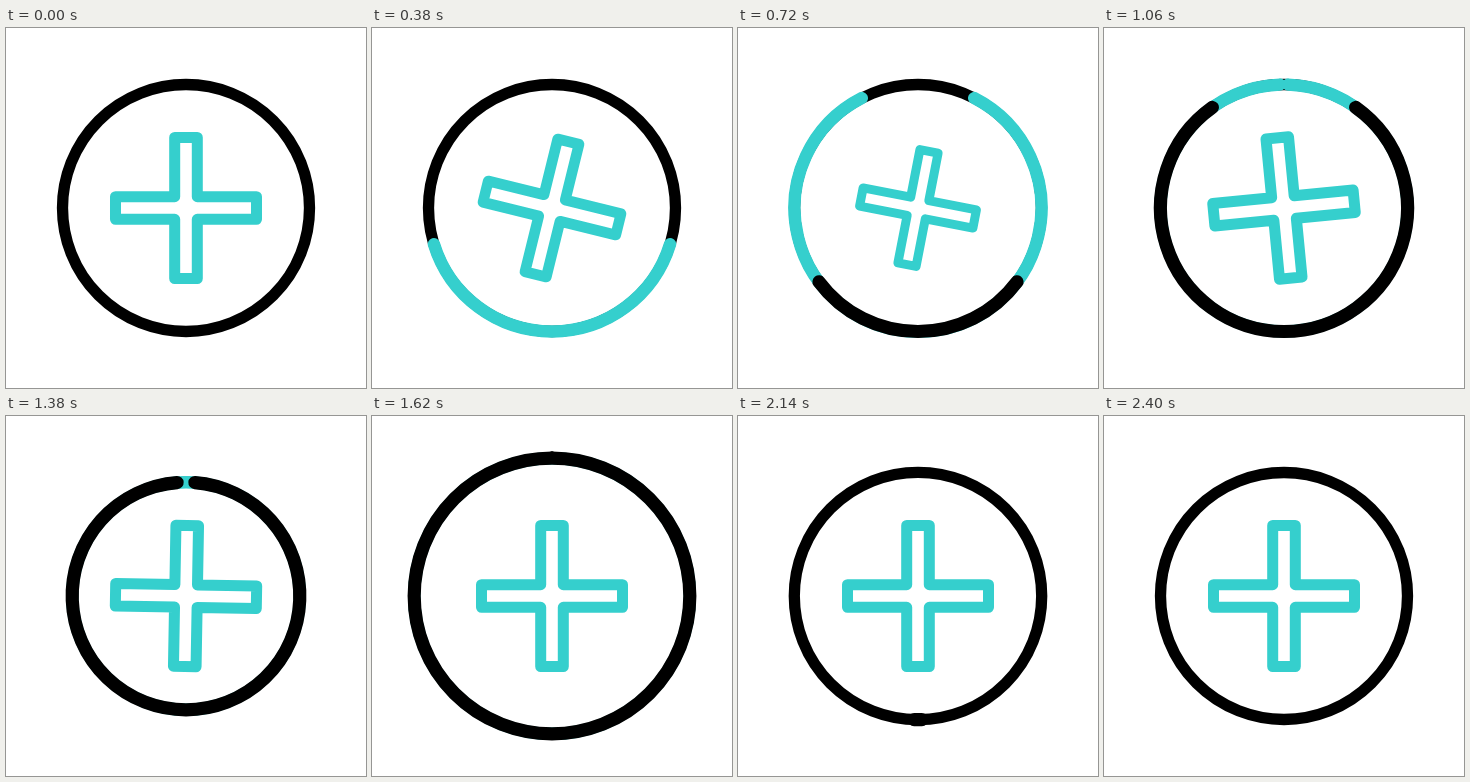
Write an HTML page that moves like this. It is 360 by 360 pixels and loops after 2.42 s.

```html
<!DOCTYPE html>
<html lang="en">
<head>
<meta charset="utf-8">
<title>Plus in a ring</title>
<style>
  html, body { margin: 0; width: 100%; height: 100%; overflow: hidden; background: #fff; }
  svg { display: block; width: 100%; height: 100%; }
  path, circle { fill: none; stroke-linecap: round; stroke-linejoin: round; }
  .ink { stroke: #000; }
  .teal { stroke: #35cfcd; }
</style>
</head>
<body>
<svg viewBox="-180 -180 360 360">
  <circle id="base" class="ink" stroke-width="11.3"/>
  <path id="tealArc" class="teal" stroke-width="12.4"/>
  <path id="inkArc" class="ink" stroke-width="13.2"/>
  <path id="plus" class="teal" stroke-width="11"
    d="M-11.3-70.5H11.3V-11.3H70.5V11.3H11.3V70.5H-11.3V11.3H-70.5V-11.3H-11.3Z"/>
</svg>
<script>
const LOOP = 2420;
const [base, tealArc, inkArc, plus] =
  ['base', 'tealArc', 'inkArc', 'plus'].map(id => document.getElementById(id));

// [time in ms, value], eased between neighbours
const RADIUS = [[1100, 123.5], [1380, 113.8], [1690, 141.3], [1860, 141.3], [2160, 123.5]];
const TURN = [[0, 0], [720, 191], [1060, 174.5], [1380, 181], [1620, 180]];
const SCALE = [[280, 1], [680, 0.81], [1000, 1]];

const clamp = u => Math.min(1, Math.max(0, u));
const smooth = u => u * u * (3 - 2 * u);
const easeOut = u => 1 - (1 - u) ** 3;
const progress = (t, start, span) => clamp((t - start) / span);

function valueAt(keys, t) {
  let value = keys[0][1];
  for (let i = 1; i < keys.length; i++) {
    const [t0, a] = keys[i - 1], [t1, b] = keys[i];
    if (t >= t0) value = a + (b - a) * smooth(progress(t, t0, t1 - t0));
  }
  return value;
}

// Arc growing from the bottom up both sides; share 1 closes the ring
function drawArc(el, r, share) {
  el.style.display = share > 0 ? '' : 'none';
  const a = Math.min(share, 0.9999) * Math.PI;
  const x = r * Math.sin(a), y = r * Math.cos(a);
  el.setAttribute('d', `M${-x} ${y}A${r} ${r} 0 0 0 0 ${r}A${r} ${r} 0 0 0 ${x} ${y}`);
}

function render(t) {
  const r = valueAt(RADIUS, t);
  base.setAttribute('r', r);
  drawArc(tealArc, r, t < 1700 ? easeOut(progress(t, 206, 1100)) : 0);
  drawArc(inkArc, r, easeOut(progress(t, 599, 1105)) - smooth(progress(t, 1830, 330)));
  plus.setAttribute('transform', `rotate(${valueAt(TURN, t)}) scale(${valueAt(SCALE, t)})`);
}

const start = performance.now();
function tick() {
  render((performance.now() - start) % LOOP);
  requestAnimationFrame(tick);
}
tick();
</script>
</body>
</html>
```
